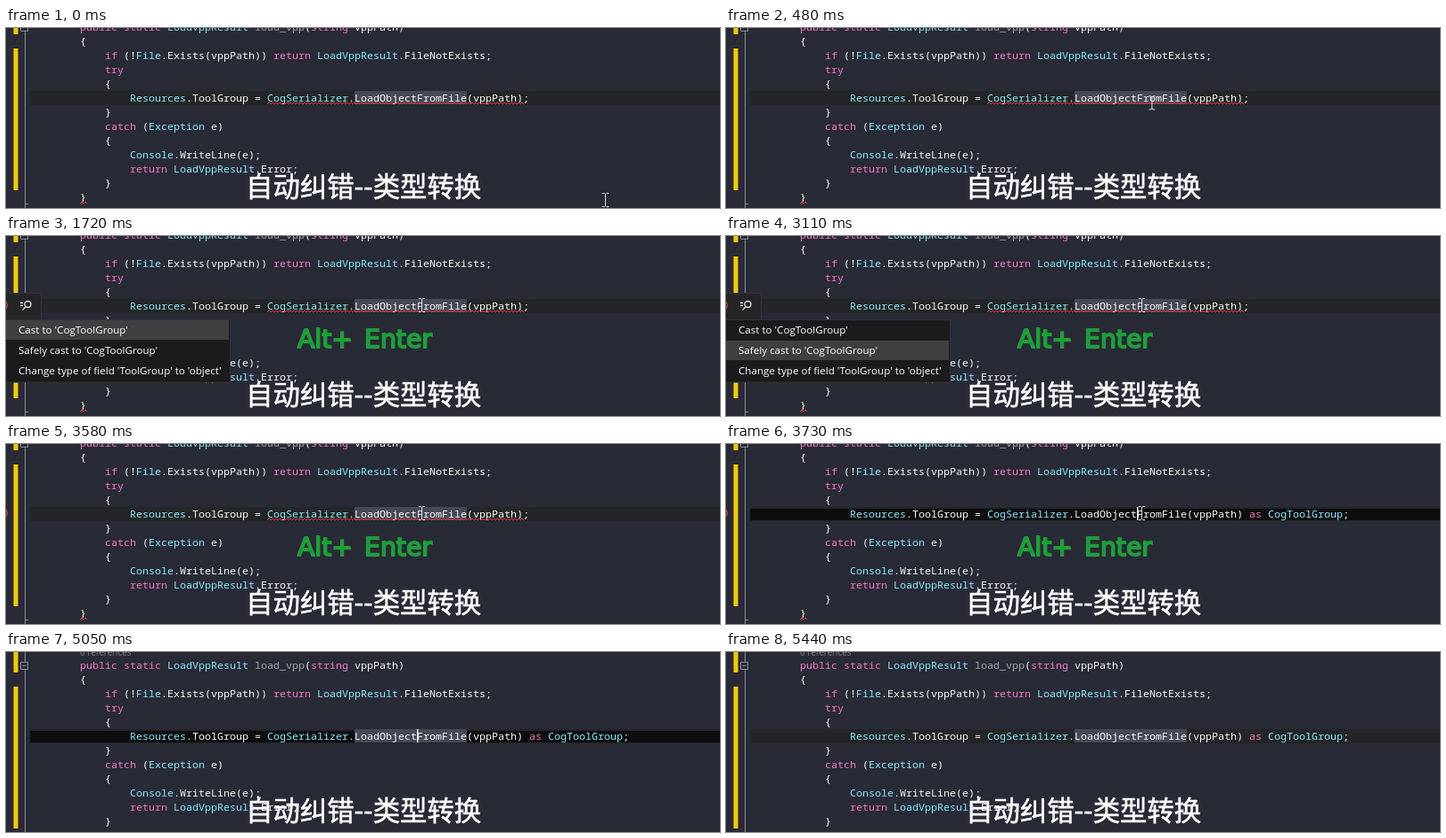
An HTML page for the animation above (5.52 s loop, 801 by 203 pixels).

```html
<!DOCTYPE html>
<html lang="zh-CN">
<head>
<meta charset="utf-8">
<title>Quick fix: type cast</title>
<style>
html, body { margin: 0; width: 100%; height: 100%; overflow: hidden; background: #282a36; }
svg { display: block; width: 801px; height: 203px; }
.code { font: 500 11.667px "Noto Sans Mono", "DejaVu Sans Mono", monospace; }
.menu { font: 11.6px "Open Sans", "Noto Sans", sans-serif; fill: #fff; }
.lens { font: 10px "Open Sans", "Noto Sans", sans-serif; fill: #8b8c92; }
.keys { font: 28.3px "DejaVu Sans", sans-serif; fill: #1f9e3a; stroke: #1f9e3a; stroke-width: 1.9; stroke-linejoin: round; }
.title { font: 500 30.4px "Noto Sans CJK SC", "Noto Sans CJK", sans-serif; fill: #fff; stroke: #fff; stroke-width: .6; }
.wave { fill: none; stroke: #e0393c; stroke-width: 1; }
.line { fill: none; stroke: #8a8c94; stroke-width: 1; }
.mark { fill: none; stroke: #c4453f; stroke-width: 1.3; }
</style>
</head>
<body>
<svg id="stage" viewBox="0 0 801 203"></svg>
<script>
const LOOP = 5520, LEFT = 83, CHAR = 7, ROW = 16;
const stage = document.getElementById('stage');

function add(parent, tag, attrs = {}, text) {
  const el = document.createElementNS('http://www.w3.org/2000/svg', tag);
  for (const key in attrs) el.setAttribute(key, attrs[key]);
  if (text !== undefined) el.textContent = text;
  parent.appendChild(el);
  return el;
}
const rect = (parent, x, y, width, height, fill, more) =>
  add(parent, 'rect', { x, y, width, height, fill, ...more });
const bulb = parent => add(parent, 'circle', { cx: -3.6, cy: 78, r: 5, class: 'mark' });
const show = (el, on) => el.setAttribute('visibility', on ? 'visible' : 'hidden');

const KEYWORDS = 'public static string if return try catch as'.split(' ');
const TYPES = 'LoadVppResult File Resources CogSerializer Exception Console CogToolGroup'.split(' ');

function colour(word) {
  if (KEYWORDS.includes(word)) return '#f679be';
  if (TYPES.includes(word)) return '#8be9fd';
  return word === 'load_vpp' ? '#a3a5aa' : '#fafaf6';
}

function codeLine(parent, row, col, text) {
  for (const m of text.matchAll(/\w+|[^\w\s]+/g))
    add(parent, 'text', { x: LEFT + CHAR * (col + m.index), y: 3 + ROW * row, fill: colour(m[0]) }, m[0]);
}

function wave(parent, x1, x2, y) {
  let d = `M${x1} ${y + 2}`;
  for (let x = x1 + 2, up = true; x <= x2; x += 2, up = !up) d += `L${x} ${up ? y : y + 2}`;
  return add(parent, 'path', { d, class: 'wave' });
}

// Editor
rect(stage, 0, 0, 801, 203, '#282a36');
const editor = add(stage, 'g', { class: 'code' });
rect(editor, 27, 71, 774, 16, '#242526');
const focus = rect(editor, 27, 73, 774, 13, '#0d0d0e');
const match = rect(editor, 391, 71, 126, 15, '#454857');
rect(editor, 8.5, -20, 5, 27, '#f3cb0b');
rect(editor, 8.5, 23, 5, 160, '#f3cb0b');
add(editor, 'path', { d: 'M21.5 -20V-5M21.5 4V210M21.5 198.5H25M16.5 -4.5h8v8h-8zM18.5 -.5h4', class: 'line' });
add(editor, 'text', { x: 83, y: -12, class: 'lens' }, '0 references');

[
  [0, 'public static LoadVppResult load_vpp(string vppPath)'],
  [0, '{'],
  [4, 'if (!File.Exists(vppPath)) return LoadVppResult.FileNotExists;'],
  [4, 'try'],
  [4, '{'],
  [8, 'Resources.ToolGroup = CogSerializer.LoadObjectFromFile(vppPath)'],
  [4, '}'],
  [4, 'catch (Exception e)'],
  [4, '{'],
  [8, 'Console.WriteLine(e);'],
  [8, 'return LoadVppResult.Error;'],
  [4, '}'],
  [0, '}'],
  [-4, '}']
].forEach(([col, text], row) => codeLine(editor, row, col, text));

const plainEnd = add(editor, 'g');
codeLine(plainEnd, 5, 71, ';');
wave(plainEnd, 293, 581, 84);
const castEnd = add(editor, 'g');
codeLine(castEnd, 5, 71, ' as CogToolGroup;');
wave(editor, 83, 91, 196);
const caret = rect(editor, 461, 71, 1.5, 15, '#f4f4f4');
const mark = bulb(editor);

// Quick actions
const bar = add(stage, 'g');
rect(bar, -1, 64.5, 40.5, 30, '#252528', { stroke: '#333337' });
bulb(bar);
add(bar, 'circle', { cx: 24.5, cy: 77, r: 3.5, fill: 'none', stroke: '#e4e4e4', 'stroke-width': 1.4 });
add(bar, 'path', { d: 'M22 80L18.5 83.5M16 75.5H19M16 78.5H19', stroke: '#e4e4e4', 'stroke-width': 1.4 });
const menu = add(stage, 'g', { class: 'menu' });
rect(menu, -1, 94.5, 252.5, 70.5, '#1b1b1d', { stroke: '#333337' });
const choice = rect(menu, 0, 95, 250, 22, '#3f3f42');
["Cast to 'CogToolGroup'", "Safely cast to 'CogToolGroup'", "Change type of field 'ToolGroup' to 'object'"]
  .forEach((text, i) => add(menu, 'text', { x: 14, y: 110 + 23 * i }, text));

// Captions and pointer
const keys = add(stage, 'g', { class: 'keys' });
add(keys, 'text', { x: 327, y: 125.6 }, 'Alt+');
add(keys, 'text', { x: 402, y: 125.6 }, 'Enter');
add(stage, 'text', { x: 269, y: 190, class: 'title' }, '自动纠错--类型转换');
const pointer = add(stage, 'path', {
  d: 'M-3.5 -7.5H-1L0 -6.5L1 -7.5H3.5M0 -6.5V6.5M-3.5 7.5H-1L0 6.5L1 7.5H3.5',
  fill: 'none', stroke: '#e0e0e0', 'stroke-width': 1
});

const ease = p => p * p * (3 - 2 * p);
const mix = (a, b, p) => a + (b - a) * p;

function pointerAt(t) {
  if (t < 4580) {
    const step = t < 70 ? 0 : Math.min(7, 1 + Math.floor((t - 70) / 78));
    const p = ease(step / 7);
    return [mix(672.5, 466.5, p), mix(194, 78, p)];
  }
  const p = Math.floor((t - 4580) / 78) / 5;
  return [mix(552.5, 744.5, p), mix(109, 193, p)];
}

function render(t) {
  const within = (a, b) => t >= a && t < b;
  const cast = t >= 3730;
  editor.setAttribute('transform', `translate(0 ${t >= 3810 ? 16 : 0})`);
  show(plainEnd, !cast);
  show(castEnd, cast);
  show(focus, within(620, 1630) || within(3730, 5440));
  show(match, !cast || t >= 4820);
  show(caret, within(620, 1090) || within(3730, 5140) || within(5280, 5440));
  show(mark, within(770, 4040));
  show(bar, within(1630, 3580));
  show(menu, within(1720, 3580));
  show(choice, within(1720, 3580));
  choice.setAttribute('y', t < 3110 ? 95 : 118);
  show(keys, within(540, 3890));
  const [x, y] = pointerAt(t);
  pointer.setAttribute('transform', `translate(${x} ${y})`);
  show(pointer, t < 5050);
}

const start = performance.now();
function tick() {
  render((performance.now() - start) % LOOP);
  requestAnimationFrame(tick);
}
tick();
</script>
</body>
</html>
```
